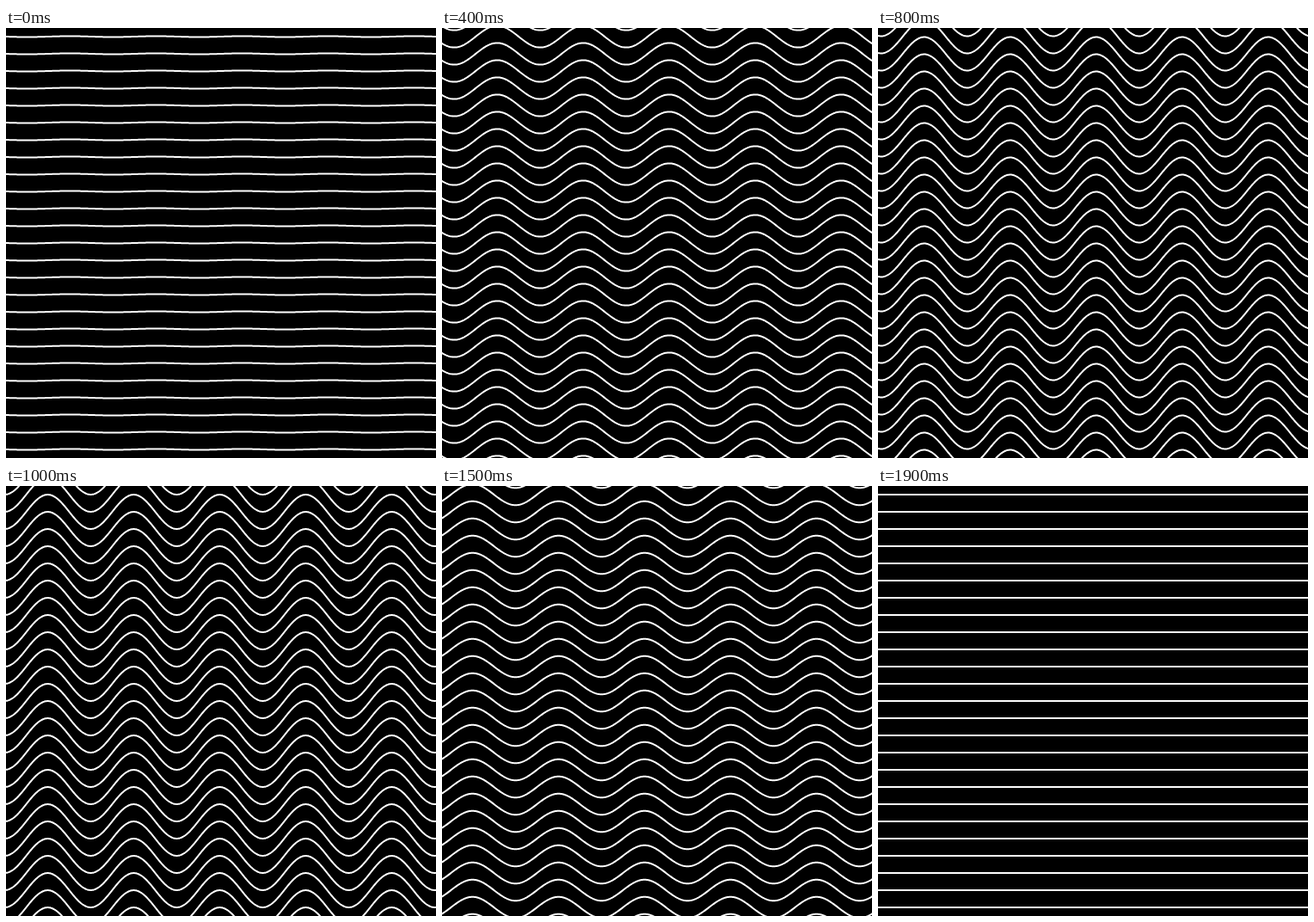
These frames come from a looping animation (500 px wide and 500 px high, 2 s). An HTML page with a canvas:

```html
<!DOCTYPE html>
<html lang="en">
<head>
<meta charset="utf-8">
<title>Waves</title>
<style>
  html, body { margin: 0; width: 100%; height: 100%; overflow: hidden; background: #000; }
  canvas { display: block; width: 500px; height: 500px; }
</style>
</head>
<body>
<canvas id="stage" width="500" height="500"></canvas>
<script>
const SIZE = 500, GAP = 20, WAVELENGTH = 100, PEAK = 20;
const STEPS = 20, STEP_MS = 100, FIRST = 1 / 120;
const ctx = document.getElementById('stage').getContext('2d');

function draw(step) {
  // Progress runs from just above flat to exactly flat over half a period.
  const progress = FIRST + (1 - FIRST) * step / (STEPS - 1);
  const phase = Math.PI * progress;
  const amplitude = PEAK * Math.sin(phase);

  ctx.fillStyle = '#000';
  ctx.fillRect(0, 0, SIZE, SIZE);
  ctx.strokeStyle = '#fff';
  ctx.lineWidth = 2;
  for (let y = -1.5 * GAP; y < SIZE + 2 * GAP; y += GAP) {
    ctx.beginPath();
    for (let x = -2; x <= SIZE + 2; x++) {
      ctx.lineTo(x, y + amplitude * Math.sin(2 * Math.PI * x / WAVELENGTH + phase));
    }
    ctx.stroke();
  }
}

let start = null, shown = 0;
function tick(now) {
  if (start === null) start = now;
  const step = Math.floor((now - start) / STEP_MS) % STEPS;
  if (step !== shown) draw(shown = step);
  requestAnimationFrame(tick);
}
draw(0);
requestAnimationFrame(tick);
</script>
</body>
</html>
```
